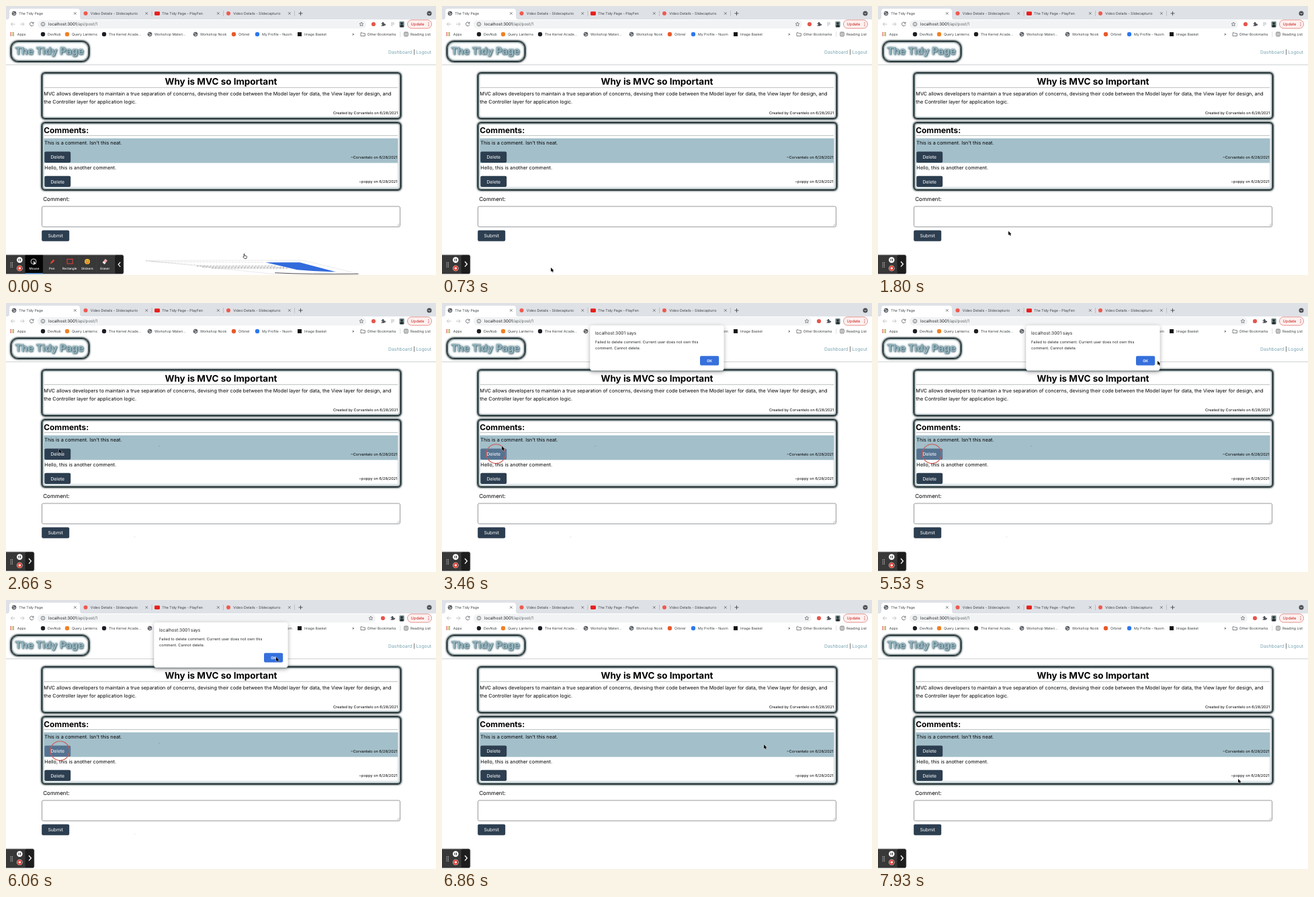
Recreate the animation shown at these times as an HTML page. Size 640x400 px, loop 8 s.

```html
<!DOCTYPE html>
<html lang="en">
<head>
<meta charset="utf-8">
<title>The Tidy Page</title>
<style>
  html, body { margin: 0; width: 100%; height: 100%; overflow: hidden; background: #fff; }
  #stage { position: absolute; left: 0; top: 0; width: 640px; height: 400px; overflow: hidden; background: #fff; }
  svg { position: absolute; left: 0; top: 0; display: block; }
  text { font-family: Inter, Roboto, sans-serif; white-space: pre; text-rendering: geometricPrecision; }
  .box { position: absolute; box-sizing: border-box; border: 1.5px solid #0a1517; background: #fff;
    box-shadow: 0 0 2.5px 1px #1c2d31, inset 0 0 2.5px 1px #2c4a50; }
  .card { left: 52.5px; width: 535px; border-radius: 5px; }
  #brand { left: 6.5px; top: 51.5px; width: 117px; height: 31px; border-radius: 11px; }
  #brandText { text-shadow: 0 0 2px #2f4c56, 1px 1px 2px #54737d, 0 0 5px #a3bfca; }
</style>
</head>
<body>
<div id="stage">
  <div id="brand" class="box"></div>
  <div class="box card" style="top:98.5px;height:69px"></div>
  <div class="box card" style="top:172.5px;height:101px"></div>
  <svg id="view" width="640" height="400" viewBox="0 0 640 400">
    <defs>
      <filter id="soft" x="-20%" y="-20%" width="140%" height="160%">
        <feDropShadow dx="0" dy="2" stdDeviation="3" flood-color="#000" flood-opacity=".38"/>
      </filter>
      <g id="globe" fill="none" stroke="#45494d" stroke-width=".8">
        <circle r="3" fill="#5f6368"/>
        <path d="M-2.5-1.2Q-.5-2 .2-.4T2.4.6M-1.6 2Q0 .4 1.6 2" stroke="#fff" stroke-width=".7"/>
      </g>
      <path id="cross" d="M-1.8-1.8L1.8 1.8M1.8-1.8L-1.8 1.8" stroke="#5f6368" stroke-width=".8"/>
      <path id="star" d="M0-3L.9-1 3-.8 1.4.6 1.9 2.7 0 1.6-1.9 2.7-1.4.6-3-.8-.9-1Z"
        fill="none" stroke="#5f6368" stroke-width=".7"/>
      <path id="puzzle" d="M-2.5-1.6H-.9A1.1 1.1 0 1 1 1.1-1.6H2.3V.1A1.1 1.1 0 1 1 2.3 1.5V2.8H-2.5V1.5A1 1 0 1 0-2.5-.2Z" fill="#50545a"/>
    </defs>
    <g id="chrome"></g>
    <g id="icons"></g>
    <g id="page"></g>
    <g id="share"></g>
    <g id="wide"></g>
    <g id="narrow"></g>
    <g id="controls"></g>
    <g id="dialog"></g>
    <g id="ghosts" fill="#000" opacity=".16"><circle cx="191.5" cy="348" r=".7"/><circle cx="228" cy="213" r=".8"/></g>
    <circle id="ring" cx="80.3" cy="224.3" r="14.3" fill="none" stroke="#cf5a54" stroke-width="1.2"/>
    <path id="arrow" d="M0 0V6.1L1.5 4.8 2.6 7.1 3.7 6.6 2.7 4.4H4.6Z" fill="#000" stroke="#fff" stroke-width=".6" paint-order="stroke"/>
    <path id="hand" d="M1.2 0Q2-.3 2.1.6V2.7L4.9 3.3Q5.8 3.6 5.5 4.6L4.9 7H1.8L-.3 4.4Q0 3.6 1.1 4.3V.4Z" fill="#fff" stroke="#111" stroke-width=".7"/>
  </svg>
</div>
<script>
const $ = id => document.getElementById(id);
const LOOP = 8000, INK = '#000', GREY = '#3c4043', NAVY = '#2c3e50', TEAL = '#78a5b3';

const text = (x, y, size, str, fill = INK, extra = '') =>
  `<text x="${x}" y="${y}" font-size="${size}" fill="${fill}" ${extra}>${str}</text>`;
const rect = (x, y, w, h, fill, r = 0, extra = '') =>
  `<rect x="${x}" y="${y}" width="${w}" height="${h}" rx="${r}" fill="${fill}" ${extra}/>`;
const dot = (x, y, r, fill) => `<circle cx="${x}" cy="${y}" r="${r}" fill="${fill}"/>`;
const path = (d, stroke, w = 1, fill = 'none') =>
  `<path d="${d}" fill="${fill}" stroke="${stroke}" stroke-width="${w}"/>`;
const use = (id, x, y) => `<use href="#${id}" x="${x}" y="${y}"/>`;
const END = 'text-anchor="end"', MID = 'text-anchor="middle"', BOLD = 'font-weight="700"';
const times = (n, f) => Array.from({ length: n }, (_, i) => f(i)).join('');

function drawChrome() {
  const clip = 'Video Details - Slidecapturio';
  const tabs = [[12, 'The Tidy Page'], [118.5, clip], [225, 'The Tidy Page - PlayFen'], [331, clip]];
  let s = rect(0, 0, 640, 20, '#dee1e6')
    + path('M2 20Q5 20 5 16V8Q5 4 9 4H106Q110 4 110 8V16Q110 20 113 20Z', 'none', 0, '#fff');
  tabs.forEach(([x, name], i) => {
    s += i === 0 ? use('globe', x, 11)
      : i === 2 ? rect(x - 4, 8.2, 8, 5.8, '#e8201c', 1.4)
      : dot(x, 11, 3, '#ee5a4f');
    s += text(x + 7.3, 13.2, 5.22, name, GREY) + use('cross', x + 90.8, 11);
    if (i) s += path(`M${x + 98.5} 7V15`, '#9aa0a6', .5);
  });
  s += path('M438.5 8V14M435.5 11H441.5', '#45494d', .9)
    + dot(630, 11, 3.5, '#4b4f54') + path('M628.4 10.3L630 12 631.6 10.3', '#fff', .7);

  s += rect(0, 20, 640, 29, '#fff')
    + path('M13.5 27H7.5M10 24.3L7.3 27 10 29.7', '#babcbe', .9)
    + path('M21 27H27M24.5 24.3L27.2 27 24.5 29.7', '#babcbe', .9)
    + path('M40.5 25.2A2.8 2.8 0 1 0 41 27.6M41 23.8V25.9H38.8', '#5f6368', .9);

  const marks = [
    [55, 'DevNub', '#1b1f23'], [91, 'Query Lanterns', '#f08024'], [146, 'The Kernel Acade...', '#1b1f23'],
    [214, 'Workshop Materi...'], [282, 'Workshop Nook'], [339, 'Orbnel', '#e8592b'],
    [374, 'My Profile - Nuom', '#2d78ee'], [437, 'Image Basket', '#111', 1]
  ];
  const hues = ['#d94b3d', '#e0a32e', '#3c8c50'];
  s += times(9, i => rect(6.2 + i % 3 * 2.1, 39 + Math.floor(i / 3) * 2.1, 1.4, 1.4, hues[i % 3]));
  s += text(16.8, 43.8, 5.2, 'Apps', GREY);
  for (const [x, name, hue, square] of marks) {
    s += !hue ? use('globe', x, 42) : square ? rect(x - 3, 39, 6, 6, hue) : dot(x, 42, 3.2, hue);
    s += text(x + 7, 43.8, 5.2, name, GREY);
  }
  s += text(515, 43.8, 6, '»', GREY)
    + path('M528 39.8H530.4L531.3 40.8H534.4V44.6H528Z', '#5f6368', .8)
    + text(537.8, 43.8, 5.2, 'Other Bookmarks', GREY)
    + path('M586.8 38V46', '#c8cacd', .6)
    + rect(592.8, 39, 5.4, 5.8, 'none', .8, 'stroke="#45494d" stroke-width=".8"')
    + path('M594 40.8H597M594 42.8H597', '#45494d', .7)
    + text(602, 43.8, 5.2, 'Reading List', GREY);
  $('chrome').innerHTML = s;
}

// The address bar grows when the media button goes away.
function drawIcons(late) {
  const x = late ? 14 : 0;
  $('icons').innerHTML = rect(47, 21, 489 + x, 12.5, '#f1f3f4', 6.2)
    + `<g fill="none" stroke="#5f6368" stroke-width=".8"><circle cx="55" cy="27" r="2.8"/><path d="M55 26.6V28.6M55 25.2V25.9"/></g>`
    + text(63, 29.2, 6.2, 'localhost:3001<tspan fill="#5f6368">/api/post/1</tspan>', '#202124')
    + use('star', 529 + x, 27) + dot(547 + x, 27, 3.1, '#e3574d') + use('puzzle', 561 + x, 27)
    + (late ? '' : path('M573 25H578M573 27H578M573 29H575.6', '#a4a7ab', .8))
    + rect(585.5, 23, 7.2, 8.4, '#6e8183', 1)
    + path('M586.6 31.4V29.4Q589.1 26.6 591.6 29.4V31.4Z', 'none', 0, '#20282b') + dot(589.1, 26, 1.7, '#20282b')
    + rect(597.5, 20.8, 36, 12.4, '#fdf1f0', 6.2, 'stroke="#d9675f" stroke-width=".7"')
    + text(602.6, 29.2, 5.8, 'Update', '#c5221f')
    + times(3, i => dot(629, 24.8 + i * 2.2, .6, '#c5221f'));
}

const button = (x, y, w, label, id = '') => rect(x, y, w, 16.3, NAVY, 2, id)
  + text(x + w / 2, y + 10.8, 6.85, label, '#fff', MID);
const rule = y => path(`M57 ${y}H583`, '#a9adb0', .8);

function drawPage() {
  const date = ' on 6/28/2021', user = 'Corvantelo';
  $('page').innerHTML =
    text(64.5, 72.2, 14.7, 'The Tidy Page', '#97b8c2', `${MID} ${BOLD} id="brandText"`)
    + path('M0 87.5H640', '#c9cccf', .9)
    + text(569, 71.2, 6.85, `Dashboard<tspan fill="#000"> | </tspan>Logout`, TEAL)
    + text(320, 117, 13.5, 'Why is MVC so Important', INK, `${MID} ${BOLD}`)
    + rule(121.3)
    + text(56.3, 133, 7.3, 'MVC allows developers to maintain a true separation of concerns, devising their code between the Model layer for data, the View layer for design, and')
    + text(56.3, 144.8, 7.3, 'the Controller layer for application logic.')
    + text(583.3, 161.2, 5.6, `Created by ${user}${date}`, INK, END)
    + text(56.3, 189, 11.85, 'Comments:', INK, BOLD)
    + rule(192.7)
    + rect(56.6, 233, 526.6, 36.2, '#fff', 0, 'stroke="#b9d0d8" stroke-width=".6"')
    + rect(56.3, 196.8, 527.2, 36.4, '#a3bfca')
    + text(57.3, 206.2, 7.3, "This is a comment. Isn't this neat.")
    + button(57.3, 216.6, 38.9, 'Delete', 'id="del"')
    + text(582.5, 226.8, 5.6, `~${user}${date}`, INK, END)
    + text(57.3, 242.6, 7.3, 'Hello, this is another comment.')
    + button(57.3, 252.8, 38.9, 'Delete')
    + text(582.5, 263.2, 5.6, `~poppy${date}`, INK, END)
    + text(55.2, 289.8, 8.1, 'Comment:')
    + rect(53.5, 298, 533, 30.4, '#fff', 2, 'stroke="#7b7f83" stroke-width=".8"')
    + path('M585.3 323.8L582.2 327M585.3 325.8L584.2 327', '#777', .5)
    + button(53.2, 333.4, 41, 'Submit');
}

function drawPanels() {
  const shell = w => rect(-3, 370, w + 3, 28.5, '#383838', 2.5, 'stroke="#a8a8a8" stroke-width=".8"');
  const names = ['Mouse', 'Pen', 'Rectangle', 'Stickers', 'Eraser'];
  const glyphs = [
    '<circle cx="41" cy="380" r="4" fill="none" stroke="#fff" stroke-width=".8"/>'
      + path('M41 378.6V385.4L42.7 383.7H45Z', '#222', .3, '#fff'),
    path('M66 383.4L66.8 380.8 70.5 376.8 72.3 378.6 68.5 382.6Z', 'none', 0, '#e5403b'),
    rect(91, 376.4, 8.2, 6.8, 'none', 0, 'stroke="#e5403b" stroke-width="1"'),
    dot(121, 380, 4, '#f2b233') + dot(119.6, 379, .6, '#4a2f10') + dot(122.4, 379, .6, '#4a2f10')
      + path('M119 381.2Q121 383.5 123 381.2', '#b33b2e', .8),
    path('M143.6 381.6L147.8 376 151 378.4 146.8 384Z', 'none', 0, '#f0a8a6')
      + path('M143.6 381.6L145.2 379.4 148.4 381.9 146.8 384Z', 'none', 0, '#e8e8e8')
  ];
  $('wide').innerHTML = shell(175) + rect(28.5, 370.5, 26.5, 27.5, '#050505') + rect(28.5, 397, 26.5, 1.3, '#4b8fd6')
    + rect(162, 370.5, 12.6, 27.5, '#1d1d1d', 2)
    + glyphs.join('') + names.map((n, i) => text(42 + i * 26.3, 391.8, 4.6, n, '#fff', `${MID} font-weight="500"`)).join('')
    + times(4, i => path(`M${81.7 + i * 26.5} 371V398`, '#464646', .5))
    + path('M170.2 380.8L167.2 384.3 170.2 387.8', '#fff', 1.2);
  $('narrow').innerHTML = shell(42) + rect(28.5, 370.5, 13, 27.5, '#1d1d1d', 2)
    + path('M34 380L37.4 383.8 34 387.6', '#fff', 1.3);
  $('controls').innerHTML = times(8, i => rect(6.6 + i % 2 * 2.3, 381 + Math.floor(i / 2) * 2.2, 1.1, 1.1, '#d0d0d0'))
    + dot(20.3, 377.6, 4.3, '#fff') + path('M19.1 375.8V379.4M21.5 375.8V379.4', '#222', 1)
    + dot(20.3, 390, 4.3, '#fff') + dot(20.3, 390, 3.8, '#d93025') + rect(18.7, 388.4, 3.2, 3.2, '#fff', .3);
  $('share').innerHTML = path('M207 378.3L441 378L526 398.5H398Z', '#d4d4d4', .5, '#fff')
    + path('M386 381.2H437L491 395.3Q462 395 433 392.2Z', 'none', 0, '#326bdc')
    + '<g stroke-dasharray="1.6 1.1 .7 1.4">'
    + path('M208 379.2L300 386M216 380L384 381', '#b4b4b4', .6)
    + path('M284 386.6H402M292 388.2L414 388.6M306 390H420', '#6a6a6a', .8)
    + '</g>' + path('M400 396.6Q450 399.2 524 398.2', '#555', 1);
  $('dialog').innerHTML = rect(220.5, 33.5, 198.8, 67, '#fff', 3, 'filter="url(#soft)"')
    + text(228, 47.4, 6.6, 'localhost:3001 says', '#202124')
    + text(228, 60.3, 5.68, 'Failed to delete comment. Current user does not own this', '#2a2c2f')
    + text(228, 69.3, 5.68, 'comment. Cannot delete.', '#2a2c2f')
    + rect(384, 78.8, 28.2, 14, '#3670dc', 2)
    + text(398.1, 87.8, 5.4, 'OK', '#fff', `${MID} font-weight="600"`);
}

// Pointer stops: time, x, y
const stops = [
  [0, 353, 368.5], [540, 168, 385], [730, 162, 389], [1060, 162, 389], [1230, 191, 346],
  [1730, 191, 346], [2130, 228, 211], [2380, 228, 211], [2660, 79, 217], [3200, 79, 223],
  [3290, 79, 223], [3460, 89, 213], [4200, 258, 152], [4440, 258, 152], [5060, 392, 98],
  [5310, 392, 98], [5530, 416, 86], [5800, 402, 85], [6150, 402, 85], [6860, 479, 215],
  [7000, 484, 221], [7100, 484, 221], [7900, 536, 266], [LOOP, 536, 266]
];
function pointer(t) {
  const i = stops.findIndex(s => s[0] > t);
  const [t0, x0, y0] = stops[i - 1], [t1, x1, y1] = stops[i];
  const p = (t - t0) / (t1 - t0), k = p * p * (3 - 2 * p);
  return [x0 + (x1 - x0) * k, y0 + (y1 - y0) * k];
}

const show = (id, on) => $(id).style.display = on ? '' : 'none';
let lateIcons = null;

function render(t) {
  const [x, y] = pointer(t);
  const hiding = Math.min(1, t / 220);
  const asked = t >= 3200 && t < 6170;
  const onHand = t < 200;
  show('share', hiding < 1);
  $('share').setAttribute('transform', `translate(${hiding * 60} ${hiding * 24})`);
  show('wide', t < 600);
  show('narrow', t >= 600);
  show('dialog', t >= 3400 && t < 6170);
  show('ring', asked);
  show('ghosts', t >= 2400 && t < 6170);
  $('del').setAttribute('fill', asked ? '#557391' : NAVY);
  show('hand', onHand);
  show('arrow', !onHand);
  $(onHand ? 'hand' : 'arrow').setAttribute('transform', `translate(${x} ${y})`);
  const late = t >= 3400;
  if (late !== lateIcons) drawIcons(lateIcons = late);
}

drawChrome();
drawPage();
drawPanels();
const start = performance.now();
function tick() {
  render((performance.now() - start) % LOOP);
  requestAnimationFrame(tick);
}
render(0);
requestAnimationFrame(tick);
</script>
</body>
</html>
```
